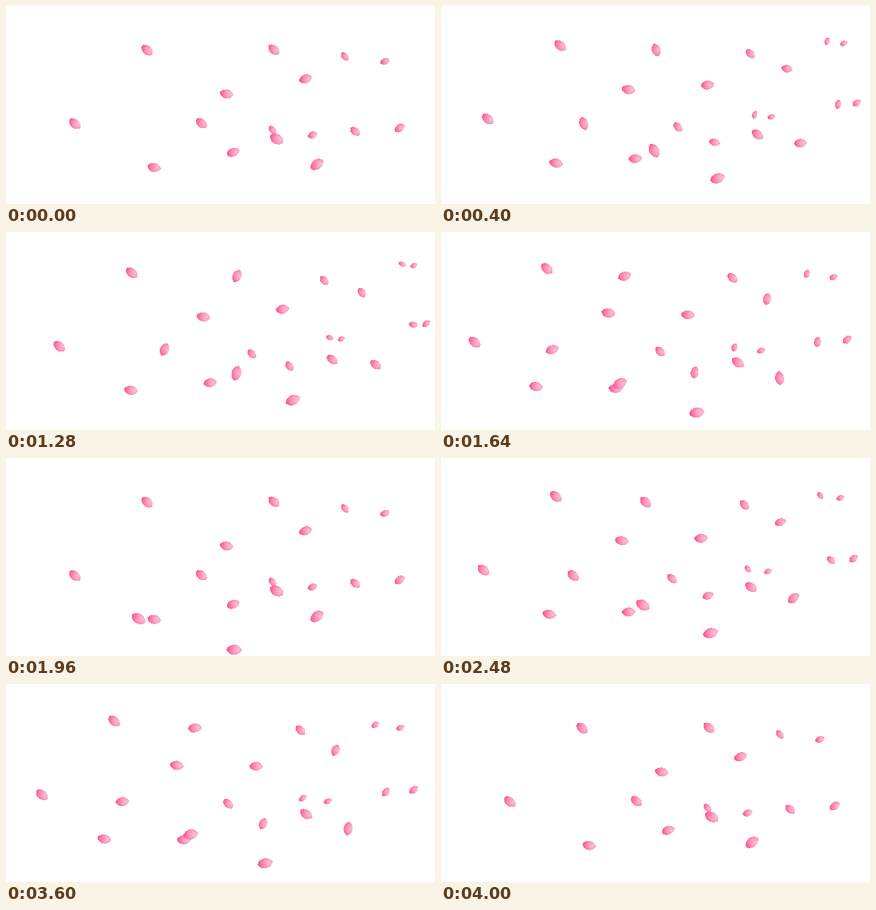
Recreate the animation shown at these times as an HTML page with a canvas. Size 650 px wide and 300 px high, loop 4.04 s.

```html
<!DOCTYPE html>
<html lang="en">
<head>
<meta charset="utf-8">
<title>Drifting petals</title>
<style>
  html, body { margin: 0; width: 100%; height: 100%; overflow: hidden; background: #fff; }
  canvas { display: block; }
</style>
</head>
<body>
<canvas id="stage" width="650" height="300"></canvas>
<script>
const W = 650, H = 300, STEP = 40, FRAMES = 101, CYCLE = 25, LAST = CYCLE - 1;
const ctx = document.getElementById('stage').getContext('2d', { willReadFrequently: true });

// turns: full turns on each leg; bend: the leg on which the resting tilt changes
const twirl = { turns: [2, 0, 1, 0], bend: 1 };
const tumble = { turns: [0, 1, 0, 0], bend: 2 };

// Each path has one petal on every leg between its key points.
const thin = [
  { kind: twirl, size: 10, tilt: 50, roll: -10, points: [[636, 37], [513.5, 76.5], [406, 66.3], [214, 67], [134, 50]] },
  { kind: tumble, size: 10, tilt: -20, roll: 31, points: [[636, 37], [574.3, 84], [454, 110.3], [334.3, 133.3], [213.5, 117.5]] }
];
const wide = [
  { kind: twirl, size: 12.5, tilt: 40, roll: -10, points: [[653.5, 119.8], [529, 190], [410.3, 201.6], [201, 243.6]] },
  { kind: tumble, size: 12.5, tilt: -37, roll: 40, points: [[653.5, 119.8], [596.6, 184.8], [471.3, 240], [345.8, 290.6]] }
];

const clamp = v => Math.min(1, Math.max(0, v));
const mix = (a, b, u) => a + (b - a) * u;

const outline = new Path2D('M-1-.05C-.85-.42-.4-.67.08-.65C.5-.63.82-.36 1 0C.8.38.45.64 0 .64C-.45.64-.88.4-1-.05Z');
// The light always comes from the right, whatever way a petal is turned.
const tint = ctx.createRadialGradient(0.5, 0, 0, 0.5, 0, 1.5);
tint.addColorStop(0, '#fbbed7');
tint.addColorStop(0.4, '#fc9cc0');
tint.addColorStop(1, '#ff4a8c');

function petal(x, y, angle, length) {
  const shape = new Path2D();
  shape.addPath(outline, new DOMMatrix().rotate(angle));
  ctx.save();
  ctx.translate(x, y);
  ctx.scale(length / 2, length / 2);
  ctx.fillStyle = tint;
  ctx.fill(shape);
  ctx.restore();
}

function drawPath({ kind, size, tilt, roll, points }, phase) {
  const u = phase / LAST;
  for (let leg = 0; leg < points.length - 1; leg++) {
    if (leg === 0 && phase === 0) continue;     // not yet born
    if (leg === 3 && phase === LAST) continue;  // already gone
    const [x, y] = points[leg].map((v, i) => mix(v, points[leg + 1][i], u));
    const s = leg + u;
    const angle = tilt + roll * clamp(s - kind.bend) - 360 * kind.turns[leg] * u;
    petal(x, y, angle, size + 5.2 * Math.min(s, 2) + 0.6 * Math.max(s - 2, 0));
  }
}

function drawGroup(paths, phase, dx = 0, dy = 0) {
  ctx.save();
  ctx.translate(dx, dy);
  for (const path of paths) drawPath(path, phase);
  ctx.restore();
}

// Petals have hard edges: each pixel is either filled or clear.
function harden() {
  const image = ctx.getImageData(0, 0, W, H), d = image.data;
  for (let i = 3; i < d.length; i += 4) d[i] = d[i] > 110 ? 255 : 0;
  ctx.putImageData(image, 0, 0);
}

let shown = -1;
function draw(time) {
  const phase = Math.floor(time / STEP) % FRAMES % CYCLE;
  if (phase === shown) return;
  shown = phase;
  ctx.clearRect(0, 0, W, H);
  drawGroup(thin, phase);
  drawGroup(thin, phase, -109.7, 111.4);
  drawGroup(wide, phase);
  harden();
}

const start = performance.now();
function tick() {
  draw(Math.max(0, performance.now() - start));
  requestAnimationFrame(tick);
}
tick();
</script>
</body>
</html>
```
